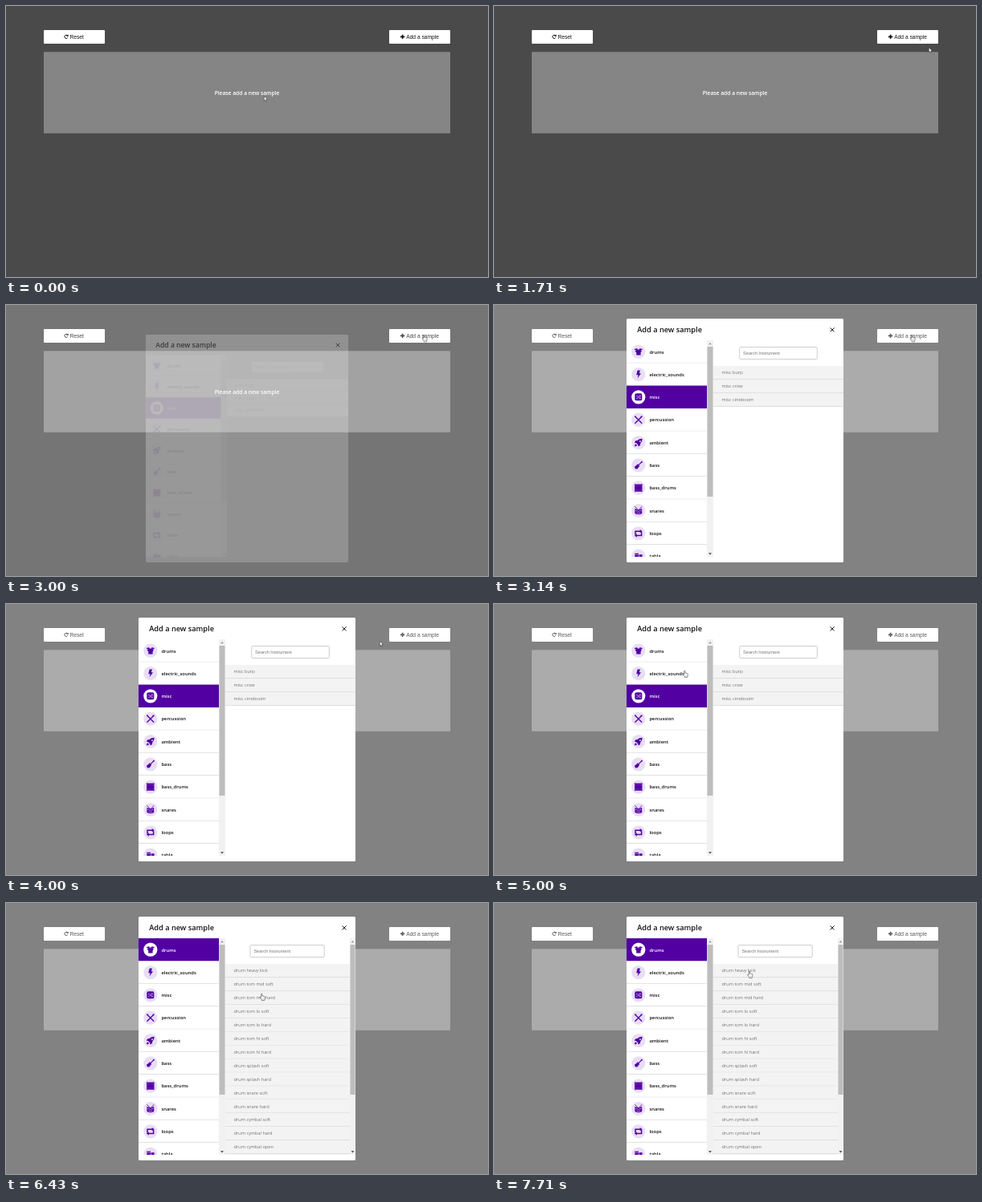
These frames come from a looping animation (600x338 px, 8000 ms). An HTML page:

```html
<!DOCTYPE html>
<html lang="en">
<head>
<meta charset="utf-8">
<title>Add a sample</title>
<style>
html, body { margin: 0; width: 100%; height: 100%; overflow: hidden; background: #4b4a4b; }
svg { display: block; width: 100%; height: 100%; }
text { font-family: "Open Sans", "Noto Sans", sans-serif; font-weight: 600; fill: #111; }
.ui { font-family: "Liberation Sans", Arial, sans-serif; font-weight: 400; }
.side { font-size: 5.85px; }
.row { font-size: 5.85px; font-weight: 300; fill: #333; }
</style>
</head>
<body>
<svg id="stage" viewBox="0 0 600 338" preserveAspectRatio="none">
  <defs>
    <clipPath id="body"><rect x="165" y="44" width="270" height="270"/></clipPath>
  </defs>
  <rect width="600" height="338" fill="#4b4a4b"/>
  <rect x="47" y="30" width="76" height="17" rx="1" fill="#fff"/>
  <path d="M76.6 37A2.1 2.1 0 1 0 76.8 39.4" fill="none" stroke="#111" stroke-width="1"/>
  <path d="M77.6 35.4v2.7h-2.7z" fill="#111"/>
  <text class="ui" x="79.4" y="40.9" font-size="6.67">Reset</text>
  <rect x="477" y="30" width="76" height="17" rx="1" fill="#fff"/>
  <path d="M493.6 35.7v5.4M490.9 38.4h5.4" stroke="#111" stroke-width="1.6"/>
  <text class="ui" x="498.2" y="40.9" font-size="6.67">Add a sample</text>
  <rect x="47" y="57.3" width="506" height="101.5" fill="#858585"/>
  <text x="300" y="110.7" font-size="6.69" text-anchor="middle" style="fill:#fff">Please add a new sample</text>
  <rect id="veil" width="600" height="338" fill="#fff"/>
  <g id="modal">
    <rect id="card" x="165" y="17" width="270" height="304" rx="1.5" fill="#fff"/>
    <g id="head">
      <text x="178.3" y="33.7" font-size="9.2">Add a new sample</text>
      <path d="M418.6 28.4l5 5M423.6 28.4l-5 5" stroke="#111" stroke-width="1"/>
    </g>
    <g id="content" clip-path="url(#body)"></g>
  </g>
  <g id="hand">
    <path d="M1.9 4.9V1.1Q1.9.3 2.5.3T3.1 1.1V3.2Q4.1 2.8 4.4 3.5Q5.3 3.1 5.5 3.9Q6.5 3.6 6.5 4.6V6Q6.5 7 5.9 7.8V8.8H2.6V8L.5 5.3Q.2 4.5.9 4.3Z"
      fill="#fff" stroke="#333" stroke-width=".55"/>
    <path d="M3.4 6v1.5M4.3 6v1.5M5.2 6v1.5" stroke="#777" stroke-width=".3"/>
  </g>
  <path id="arrow" d="M.3.3V6.2L1.7 5L2.6 7.2L3.6 6.8L2.7 4.6H4.4Z" fill="#fff" stroke="#222" stroke-width=".5"/>
</svg>
<script>
const $ = id => document.getElementById(id);
const PURPLE = '#5200a2', LILAC = '#e8def4', LINE = '#cfcfcf';
const FRAME = 1000 / 7, LOOP = 8000;

const rect = (x, y, w, h, fill, extra = '') =>
  `<rect x="${x}" y="${y}" width="${w}" height="${h}" fill="${fill}" ${extra}/>`;
const text = (cls, x, y, s, extra = '') => `<text class="${cls}" x="${x}" y="${y}" ${extra}>${s}</text>`;
const fill = d => `<path d="${d}" fill="${PURPLE}" fill-rule="evenodd"/>`;
const line = (d, w, color = PURPLE) =>
  `<path d="${d}" fill="none" stroke="${color}" stroke-width="${w}" stroke-linecap="round"/>`;

// Icons are drawn around their own centre.
const categories = [
  ['drums', fill('M-5-3.3L-1.4-4.2V-2.8H1.4V-4.2L5-3.3L4.7-2.3L2.8-1.9L4.1-.6L2.8 1V4.2H-2.6V1L-4.2-.5L-2.8-2L-4.8-2.3Z')],
  ['electric_sounds', fill('M-1.2-5H2.2L1-1.4H3.2L-1.2 5L-.2.7H-2.6Z')],
  ['misc', fill('M-2.7-4.5H2.7Q4.5-4.5 4.5-2.7V2.7Q4.5 4.5 2.7 4.5H-2.7Q-4.5 4.5-4.5 2.7V-2.7Q-4.5-4.5-2.7-4.5Z')
    + line('M-2.7-1.5H-1.4L1.2 1.5H2.6M-2.7 1.5H-1.4L1.2-1.5H2.6M2-2.2L2.7-1.5L2-.8M2 .8L2.7 1.5L2 2.2', .6, LILAC)],
  ['percussion', line('M-4-4L4 4M4-4L-4 4', 1.3) + fill('M-5-4.3L-3.6-5L-2.6-3.5L-3.6-2.6ZM5-4.3L3.6-5L2.6-3.5L3.6-2.6Z')],
  ['ambient', fill('M4.8-4.8Q1-5-1.2-2.4L-3.6-2.2L-5 .3L-2.9.5L-.5 2.9L-.3 5L2.2 3.6L2.4 1.2Q5-1 4.8-4.8ZM2.9-2.1A.9.9 0 1 1 2.8-2.2ZM-3.5 1.7Q-5 2.5-4.8 4.8Q-2.5 5-1.7 3.5Z')],
  ['bass', line('M-1 1L4.2-4.2', 1.2) + fill('M3-4.5L4.2-5.2L5.2-4L4.3-3ZM-1.7-1.2Q-.2-1.4.1-.1Q1.6.3 1 1.8Q-.2 2-.3 3.3Q-1.2 5-3.3 4.6Q-5.2 3.6-4.6 1.4Q-3.8.5-2.7.3Q-2.3-.2-1.7-1.2Z')],
  ['bass_drums', fill('M-4.3-4.6H4.3V4.6H-4.3Z') + line('M-3.6-4.6V4.6M3.6-4.6V4.6M-4-2.8H4M-4 2.8H4', .3, '#9a70c8')
    + line('M-4.3-4.6v9.2M4.3-4.6v9.2', .8)],
  ['snares', line('M-4.2-4.8L-1.5-2.2M4.2-4.8L1.5-2.2', .9) + fill('M-4.4-2.6Q0-.6 4.4-2.6V3.4Q0 6-4.4 3.4Z')
    + line('M-3.4.1Q0 1.5 3.4.1M-2 3Q0 3.7 2 3', .6, LILAC)],
  ['loops', line('M-3.8 1.2V-2.6H3M3.8-1.2V2.6H-3', 1.5) + fill('M1.9-4.8L4.9-2.6L1.9-.5ZM-1.9 4.8L-4.9 2.6L-1.9.5Z')],
  ['tabla', fill('M-4.5-3.5H.2V4H-4.5ZM.8-2H4.8V4H.8Z') + line('M-4.1-1.7H-.2', .5, LILAC)]
];

const hits = ['heavy kick', ...['tom mid', 'tom lo', 'tom hi', 'splash', 'snare', 'cymbal']
  .flatMap(s => [s + ' soft', s + ' hard']), 'cymbal open', 'cymbal close'];
const order = ['tom mid soft', 'tom mid hard', 'tom lo soft', 'tom lo hard'];
const drumRows = hits.map(s => 'drum ' + s);
const miscRows = ['burp', 'crow', 'cineboom'].map(s => 'misc ' + s);

function sidebar(active) {
  return categories.map(([name, icon], i) => {
    const top = 44 + 28.33 * i, mid = top + 14.2, on = i === active;
    return rect(165, top, 100, 28.33, on ? PURPLE : '#fff')
      + rect(165, top + 27.9, 100, .6, on ? PURPLE : '#bbb')
      + `<circle cx="179.8" cy="${mid}" r="8.6" fill="${on ? '#fff' : LILAC}"/>`
      + `<g transform="translate(179.8 ${mid})">${icon}</g>`
      + text('side', 193.4, mid + 2.3, name, on ? 'style="fill:#fff"' : '');
  }).join('');
}

function scrollbar(x, w) {
  const c = x + w / 2;
  return rect(x, 44, w, 270, '#f1f1f1') + rect(x + .5, 52, w - 1, 187, '#bdbdbd')
    + `<path d="M${c - 2} 49.3h4l-2-2.2z" fill="#999"/><path d="M${c - 2} 309.2h4l-2 2.2z" fill="#444"/>`;
}

function results(rows, right, boxX, boxW) {
  return rect(boxX, 52.5, boxW, 15, '#fff', 'rx="1.2" stroke="#bbb" stroke-width=".7"')
    + text('ui', boxX + 4.4, 61.9, 'Search Instrument', 'font-size="5.6" style="fill:#757575"')
    + rows.map((s, i) => {
      const top = 76 + 16.92 * i;
      return rect(273, top, right - 273, 16.92, '#f3f3f3')
        + rect(273, top + 16.4, right - 273, .6, LINE) + text('row', 283.5, top + 10.3, s);
    }).join('');
}

$('content').innerHTML = scrollbar(265, 8)
  + `<g id="misc">${sidebar(2)}${results(miscRows, 435, 305.7, 96.6)}</g>`
  + `<g id="drums">${sidebar(0)}${results(drumRows, 428, 304, 92.2)}${scrollbar(428, 7)}</g>`;

// Pointer path: [step, x, y]
const path = [
  [0, 321, 112], [1, 430, 76], [2, 541, 37], [11, 541, 37], [13, 541, 66], [16, 517.6, 37],
  [27, 517.6, 37], [28, 465, 46], [29, 350, 68], [30, 262, 81], [31, 234.8, 82.8],
  [36, 234.8, 82.8], [38, 212, 58], [42, 212, 58], [45, 315.8, 112.8], [50, 315.8, 112.8], [54, 315.3, 84.8], [56, 315.3, 84.8]
];

function pointerAt(k) {
  const i = path.findIndex(p => p[0] >= k);
  if (i < 1) return path[0].slice(1);
  const [a, ax, ay] = path[i - 1], [b, bx, by] = path[i], u = (k - a) / (b - a);
  return [ax + (bx - ax) * u, ay + (by - ay) * u];
}

const within = (x, y, l, t, r, b) => x >= l && x <= r && y >= t && y <= b;
const show = (id, on) => $(id).setAttribute('display', on ? 'inline' : 'none');
const fade = (id, o) => $(id).setAttribute('opacity', o);

function draw(t) {
  const k = Math.floor((t + 5) / FRAME);
  const opening = k === 21, drums = k >= 39;
  fade('veil', k < 20 ? 0 : k === 20 ? .055 : opening ? .24 : .31);
  show('modal', k > 20);
  $('modal').setAttribute('transform', opening ? 'translate(300 321) scale(.934) translate(-300 -321)' : '');
  fade('card', opening ? .2 : 1);
  fade('head', opening ? .68 : 1);
  fade('content', opening ? .07 : 1);
  show('misc', !drums);
  show('drums', drums);

  const [x, y] = pointerAt(k);
  const hand = k < 28 ? within(x, y, 477, 30, 553, 47)
    : within(x, y, 165, 44, 265, 314) || within(x, y, 273, 76, 428, drums ? 314 : 126);
  show('hand', hand);
  show('arrow', !hand);
  $(hand ? 'hand' : 'arrow').setAttribute('transform', `translate(${x} ${y})`);
}

const start = performance.now();
function tick() {
  draw((performance.now() - start) % LOOP);
  requestAnimationFrame(tick);
}
tick();
</script>
</body>
</html>
```
